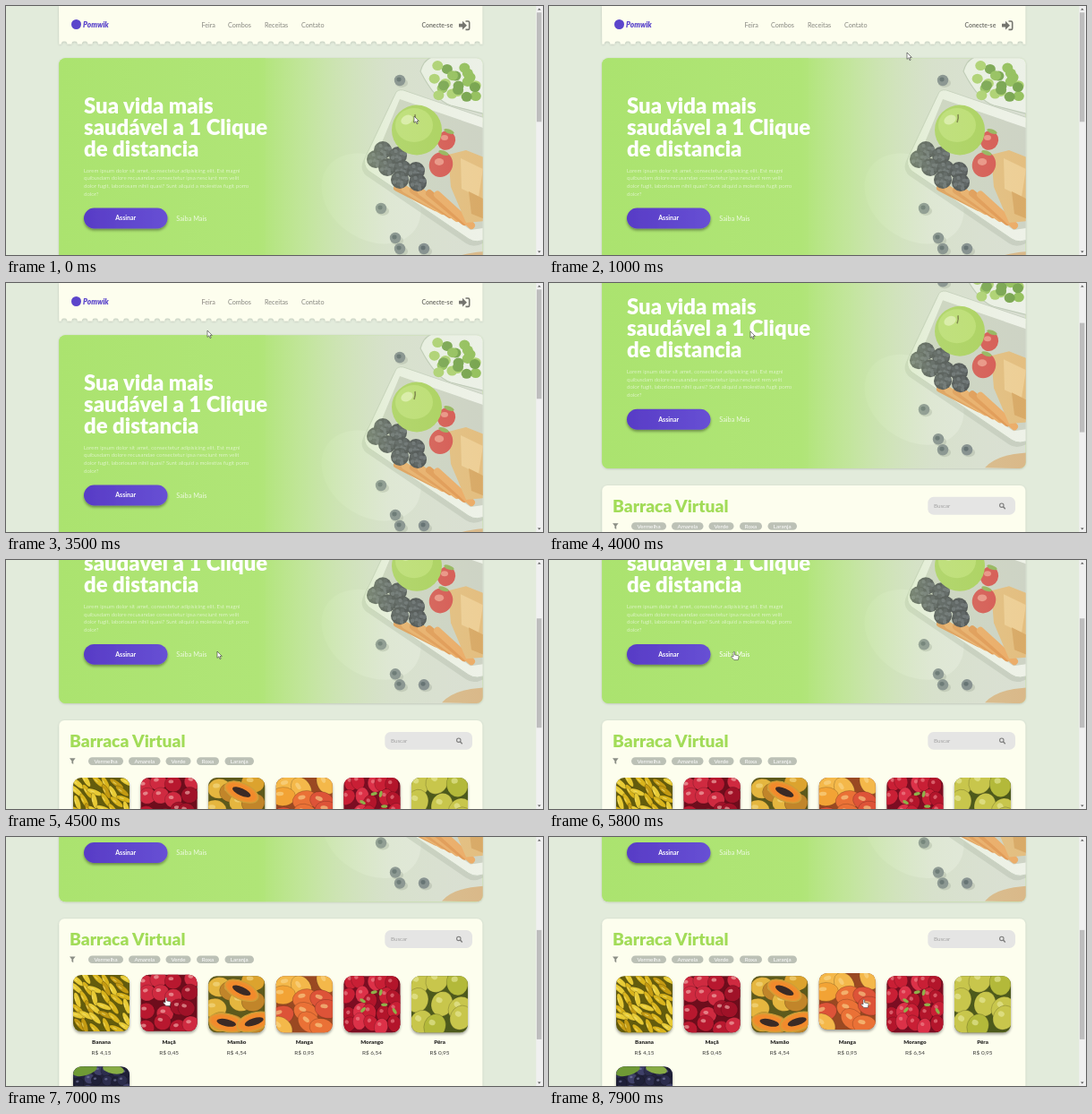
Write an HTML page that moves like this. It is 600x278 px and loops after 8000 ms.

```html
<!DOCTYPE html>
<html lang="pt">
<head>
<meta charset="utf-8">
<title>Barraca Virtual</title>
<style>
html, body { margin: 0; width: 100%; height: 100%; overflow: hidden; background: #e2ebdb; }
svg { display: block; width: 600px; height: 278px; font-family: Lato, "Open Sans", sans-serif; }
</style>
</head>
<body>
<svg id="stage" viewBox="0 0 600 278" xmlns="http://www.w3.org/2000/svg"></svg>
<script>
const LOOP = 8000, NOTCH = 43.9;
const rand = n => { const v = Math.sin(n * 12.9898 + 4.1) * 43758.5453; return v - Math.floor(v); };
const ease = p => { p = Math.min(1, Math.max(0, p)); return p * p * (3 - 2 * p); };
const range = n => [...Array(n).keys()];

// ---- drawing helpers ----
const text = (x, y, size, weight, fill, str, extra = '') =>
  `<text x="${x}" y="${y}" font-size="${size}" font-weight="${weight}" fill="${fill}" ${extra}>${str}</text>`;
const oval = (x, y, rx, ry, fill, turn = 0, extra = '') =>
  `<ellipse cx="${x}" cy="${y}" rx="${rx}" ry="${ry}" fill="${fill}" transform="rotate(${turn} ${x} ${y})" ${extra}/>`;
const box = (x, y, w, h, r, fill, extra = '') =>
  `<rect x="${x}" y="${y}" width="${w}" height="${h}" rx="${r}" fill="${fill}" ${extra}/>`;
const shape = (d, fill, extra = '') => `<path d="${d}" fill="${fill}" ${extra}/>`;

// Overlapping fruit on a jittered grid inside a 63 x 63 tile.
function pile({ cols, rows, rx, ry, turn = 0, spread = 30, tones, shine, seed }) {
  return range(cols * rows).map(i => {
    const k = seed * 100 + i * 5;
    const x = ((i % cols) + .2 + .6 * rand(k)) * 63 / cols;
    const y = (Math.floor(i / cols) + .2 + .6 * rand(k + 1)) * 63 / rows;
    const angle = turn + (rand(k + 2) - .5) * spread;
    const tone = tones[Math.floor(rand(k + 3) * tones.length)];
    return oval(x, y, rx, ry, tone, angle, 'stroke="#000" stroke-opacity=".22" stroke-width=".8"') +
      oval(x - rx * .25, y - ry * .3, rx * .3, ry * .22, shine, angle, 'opacity=".6"');
  }).join('');
}

const papayaHalf = (x, y, turn) =>
  oval(x, y, 20, 10, '#e9932f', turn, 'stroke="#c9a13a"') +
  oval(x, y, 17, 7.5, '#f28a2c', turn) + oval(x, y, 11, 4, '#3b2a25', turn);
const leaves = seed => range(6).map(i =>
  oval(6 + 51 * rand(seed + i), 5 + 52 * rand(seed + i + 20), 3.6, 1.8, '#8fb04a', 360 * rand(seed + i + 40))).join('');

const products = [
  { name: 'Banana', price: '4,15', bg: '#635c10', art: () =>
    pile({ cols: 6, rows: 6, rx: 9, ry: 3, turn: 48, spread: 60, tones: ['#d9b41c', '#e8cb35', '#c39a12'], shine: '#f6e880', seed: 1 }) },
  { name: 'Maçã', price: '0,45', bg: '#6e0d1c', art: () =>
    pile({ cols: 4, rows: 4, rx: 9.5, ry: 9, tones: ['#b8182f', '#cf2a40', '#a01228'], shine: '#f5b9b4', seed: 2 }) },
  { name: 'Mamão', price: '4,54', bg: '#5d5a1c', art: () =>
    pile({ cols: 3, rows: 3, rx: 13, ry: 11, tones: ['#dca32e', '#e5b63f', '#c1852a'], shine: '#f5dc8a', seed: 3 }) +
    papayaHalf(37, 16, 24) + papayaHalf(20, 52, 12) + papayaHalf(51, 51, -18) },
  { name: 'Manga', price: '0,95', bg: '#9a4a20', art: () =>
    pile({ cols: 3, rows: 4, rx: 14, ry: 10.5, turn: 25, spread: 90, tones: ['#f2a335', '#ea7136', '#f4b84a', '#dd5338'], shine: '#fbd98f', seed: 4 }) },
  { name: 'Morango', price: '6,54', bg: '#7b1020', art: () =>
    pile({ cols: 5, rows: 4, rx: 7.5, ry: 9.5, spread: 90, tones: ['#c91f35', '#dc3148', '#b3152b'], shine: '#f08a90', seed: 5 }) + leaves(7) },
  { name: 'Pêra', price: '0,95', bg: '#4d5a1a', art: () =>
    pile({ cols: 3, rows: 3, rx: 12, ry: 14, turn: 15, spread: 60, tones: ['#b3b93a', '#c8c64c', '#9ea72e'], shine: '#eaeba0', seed: 6 }) },
  { name: 'Uva', price: '3,20', bg: '#22213a', art: () =>
    pile({ cols: 6, rows: 6, rx: 5.8, ry: 5.8, tones: ['#2c2d4d', '#3f4068', '#1f2038'], shine: '#7d80aa', seed: 8 }) +
    oval(13, 4, 14, 6, '#6f9a35', -15) + oval(45, 3, 12, 5, '#88ad45', 10) }
].map((p, i) => ({ ...p, x: 75 + 75.6 * (i % 6), y: 374.8 + 101 * Math.floor(i / 6) }));

const nav = [['Feira', 218.5], ['Combos', 248], ['Receitas', 289], ['Contato', 330]];

function header() {
  const teeth = 41, step = 473 / teeth;
  const edge = range(teeth).map(() => `h-2.4a3.35 3.35 0 0 0 -6.7 0h${-(step - 9.1)}`).join('');
  return shape(`M59 0H532.3V42.6${edge}Z`, '#fdfeee', 'filter="url(#soft)"') +
    oval(78.5, 20.5, 5.5, 5.5, '#5b45cb') + text(86, 24, 8.4, 900, '#5b45cb', 'Pomwik', 'font-style="italic"') +
    nav.map(([label, x]) => text(x, 24.3, 7.2, 400, '#85857f', label, 'class="nav"')).join('') +
    text(464.5, 24.2, 6.9, 700, '#75756f', 'Conecte-se') +
    shape('M506 19.8h4v-3l5 4.9l-5 4.9v-3h-4z', '#75756f') +
    shape('M513.5 17h2.8q1.4 0 1.4 1.4v6.6q0 1.4-1.4 1.4h-2.8', 'none', 'stroke="#75756f" stroke-width="1.6"');
}

const berry = ([x, y]) => oval(x, y, 10, 10, '#34363f') + range(14).map(i =>
  oval(x + 8 * Math.cos(i * 2.4) * Math.sqrt(i / 14), y + 8 * Math.sin(i * 2.4) * Math.sqrt(i / 14), 2.3, 2.3, i % 2 ? '#555964' : '#41444e')).join('');
const blueberry = ([x, y]) => oval(x + 2, y + 3, 7, 5, '#a3aaa0', 0, 'opacity=".5"') +
  oval(x, y, 6.2, 6.2, '#737c84') + oval(x - 1, y - 1, 2.6, 2.4, '#495560');
const strawberry = (x, y, r) => oval(x, y, r, r * 1.1, '#d64a47', 25) + oval(x - 2, y - 3, r * .4, r * .3, '#ed8a7e') +
  oval(x + 3, y - r, 6, 2.3, '#8eb052', 20);

function lunch() {
  const carrots = range(6).map(i =>
    `<path d="M${437 + i * 9} ${203 + i * 1.5}L${480 + i * 8} ${225 + i * 4}" stroke="${i % 2 ? '#eda65e' : '#e39148'}" stroke-width="8" stroke-linecap="round"/>`).join('');
  const broccoli = range(22).map(i =>
    oval(478 + 48 * rand(i + 60), 66 + 36 * rand(i + 90), 6, 5.5, ['#8fbd55', '#a9cf69', '#709f45'][i % 3])).join('');
  const tray = 'M436 96Q440 92 447 95L538 126V259Q526 266 517 260L405 184Q398 177 402 168Z';
  return box(290, 58, 243, 234, 0, '#d9ded3') +
    oval(408, 215, 60, 45, '#e3e7de', 35) +
    shape('M463 73Q467 58 480 56H536V121L497 111Q480 106 463 73Z', '#edf1e9', 'stroke="#bcc7b6" stroke-width="1.2"') + broccoli +
    shape(tray, '#aeb5a8', 'transform="translate(-3 5)" opacity=".45"') +
    shape(tray, '#eff2ea', 'stroke="#c6cec0"') +
    shape('M440 104L533 136V248L519 250L410 176Z', '#ccd1c4') + carrots +
    shape('M494 166L514 161L537 170V240L514 242L497 202Z', '#e4ba79') +
    shape('M508 170L533 182L528 213L509 204Z', '#efcc91') + shape('M517 207L535 216V238L520 232Z', '#d8a45e') +
    [[421, 161], [413, 171], [438, 167], [426, 180], [443, 182], [458, 184], [440, 194], [460, 197]].map(berry).join('') +
    strawberry(492, 150, 10) + strawberry(486, 177, 13) +
    oval(459, 138.5, 28, 28, '#a6cf52') + oval(456, 133, 21, 19, '#b9dd68') + oval(448, 127, 7, 5, '#dcefa5', -25) +
    shape('M456 130Q458 125 457 121', 'none', 'stroke="#6b7130" stroke-width="1.6"') +
    [[440, 83], [419, 226], [435, 259], [440, 271], [467, 271]].map(blueberry).join('') +
    shape('M487 291Q500 276 535 274V292Z', '#d9b483');
}

function hero() {
  const lorem = ['Lorem ipsum dolor sit amet, consectetur adipisicing elit. Est magni',
    'quibusdam dolore recusandae consectetur ipsa nesciunt rem velit',
    'dolor fugit, laboriosam nihil quasi? Sunt aliquid a molestias fugit porro', 'dolor?'];
  return box(59.3, 58.3, 473.4, 233.4, 7, '#aee472', 'filter="url(#soft)"') +
    `<g clip-path="url(#heroClip)">${lunch()}${box(59, 58, 474, 234, 0, 'url(#fade)')}</g>` +
    ['Sua vida mais', 'saudável a 1 Clique', 'de distancia'].map((s, i) => text(87, 119.8 + i * 24.2, 23.9, 900, '#fff', s)).join('') +
    lorem.map((s, i) => text(87, 185.7 + i * 8.75, 6.2, 300, '#fff', s)).join('') +
    box(87, 225.6, 93.5, 22.8, 11.4, 'url(#violet)', 'filter="url(#drop)"') +
    text(133.7, 239.4, 7, 700, '#fff', 'Assinar', 'text-anchor="middle"') +
    text(190.3, 239.6, 7.3, 400, '#fff', 'Saiba Mais', 'id="more"');
}

function market() {
  const pills = [['Vermelha', 92, 39], ['Amarela', 137, 35.5], ['Verde', 178.5, 28], ['Roxa', 213, 25], ['Laranja', 244.5, 32.5]];
  return box(59.3, 310.8, 473, 320, 6, '#fdfeee', 'filter="url(#soft)"') +
    text(71, 340.4, 19.2, 900, '#a2dc58', 'Barraca Virtual') +
    box(423.3, 323.6, 97.7, 19.8, 6.5, '#e5e5e4') + text(430, 335.8, 6.2, 400, '#a3a3a3', 'Buscar') +
    '<circle cx="505.8" cy="332.9" r="2.2" fill="none" stroke="#7d7d7d" stroke-width="1.1"/><path d="M507.4 334.5l2.4 2.4" stroke="#7d7d7d" stroke-width="1.4"/>' +
    shape('M71 353h6.6l-2.4 3.1v3.6l-1.8-1.2v-2.4z', '#8b8e86') +
    pills.map(([s, x, w]) => box(x, 352, w, 8.6, 4.3, '#bcc1b6') +
      text(x + w / 2, 358.4, 6.3, 400, '#fff', s, 'text-anchor="middle"')).join('') +
    products.map(p => `<g class="tile"><rect x="${p.x}" y="${p.y}" width="63" height="63" rx="9" fill="${p.bg}" filter="url(#drop)"/>
      <g transform="translate(${p.x} ${p.y})"><g clip-path="url(#tileClip)">${p.art()}</g></g></g>` +
      text(p.x + 31.5, p.y + 75.9, 6.2, 900, '#2c2c2a', p.name, 'text-anchor="middle"') +
      text(p.x + 31.5, p.y + 87.2, 6.4, 400, '#3c3c3a', 'R$ ' + p.price, 'text-anchor="middle"')).join('');
}

const shadow = (id, dy, blur, alpha) =>
  `<filter id="${id}" x="-20%" y="-20%" width="140%" height="150%"><feDropShadow dx="0" dy="${dy}" stdDeviation="${blur}" flood-opacity="${alpha}"/></filter>`;

const stage = document.getElementById('stage');
stage.innerHTML = `<defs>
  ${shadow('soft', .6, .8, .18)}${shadow('drop', 2, 1.8, .38)}
  <clipPath id="heroClip">${box(59.3, 58.3, 473.4, 233.4, 7, '#000')}</clipPath>
  <clipPath id="tileClip">${box(0, 0, 63, 63, 9, '#000')}</clipPath>
  <linearGradient id="fade">
    <stop offset="0" stop-color="#abe36f"/><stop offset=".47" stop-color="#b0e577"/>
    <stop offset=".58" stop-color="#bde78f" stop-opacity=".82"/>
    <stop offset=".78" stop-color="#d2e8b8" stop-opacity=".28"/><stop offset="1" stop-color="#e0ecd0" stop-opacity=".08"/>
  </linearGradient>
  <linearGradient id="violet"><stop offset="0" stop-color="#583cc6"/><stop offset="1" stop-color="#6750d4"/></linearGradient>
</defs>
${box(0, 0, 600, 278, 0, '#e2ebdb')}
<g id="page">${header()}${hero()}${market()}</g>
${box(592.3, 0, 7.7, 278, 0, '#f0f0f0')}
${box(593, 7.3, 5.4, 122, 0, '#bdbdbd', 'id="thumb"')}
${shape('M594 4.6l1.8-2.2l1.8 2.2zM594 273.4l1.8 2.2l1.8-2.2z', '#555')}
<g id="cursor">
  ${shape('M0 0V7.4L1.8 5.8L3 8.6L4.2 8.1L3 5.4H5.3Z', '#fff', 'id="arrow" stroke="#333" stroke-width=".6"')}
  ${shape('M0 .8Q.8-.3 1.6.8V4L5.4 4.7Q6.2 5 6 6L5.3 9.6H.8L-2.2 6.2Q-2.2 5-1 5.3L0 6Z', '#fff', 'id="hand" stroke="#444" stroke-width=".6"')}
</g>`;

// ---- motion ----
// Cursor stops: time, x, y.
const route = [[0, 456, 123], [300, 456, 123], [1000, 400, 52], [1500, 342, 24], [1750, 342, 24], [2050, 309, 25], [2250, 309, 25],
  [2600, 262, 25], [2800, 262, 25], [3100, 226, 25], [3250, 226, 27], [3500, 225, 53], [4100, 225, 54], [4500, 236, 102],
  [4850, 206, 102], [5200, 142, 105], [5400, 142, 105], [5750, 206, 102], [6300, 206, 102], [6600, 108, 182], [6800, 112, 183],
  [7000, 178, 179], [7130, 180, 179], [7350, 258, 183], [7480, 260, 183], [7700, 351, 181], [8000, 351, 181]];
const wheel = [3650, 3850, 4050, 5950, 6150];

function pointer(t) {
  const i = Math.max(1, route.findIndex(p => p[0] >= t));
  const [t0, x0, y0] = route[i - 1], [t1, x1, y1] = route[i];
  const k = ease((t - t0) / (t1 - t0));
  return [x0 + (x1 - x0) * k, y0 + (y1 - y0) * k];
}
const scrollAt = t => wheel.reduce((sum, at) => sum + NOTCH * ease((t - at) / 180), 0);

const zones = {
  nav: nav.map(([s, x]) => [x - 2, 16, s.length * 3.4 + 4, 17]),
  button: [87, 225, 94, 24],
  more: [189, 231, 36, 13],
  login: [464, 15, 55, 13],
  tiles: products.map(p => [p.x, p.y, 63, 63])
};
const allZones = [...zones.nav, zones.button, zones.more, zones.login, ...zones.tiles];

function over([x, y, w, h], t) {
  const [px, py] = pointer(t), dx = px - x, dy = py + scrollAt(t) - y;
  return dx >= 0 && dx <= w && dy >= 0 && dy <= h;
}
// Share of the last 200 ms spent over a zone: a transition that depends on time only.
const hover = (zone, t) => ease(range(20).filter(i => over(zone, t - i * 10)).length / 20);
const mix = (a, b, k) => `rgb(${a.map((v, i) => Math.round(v + (b[i] - v) * k))})`;

const $ = id => document.getElementById(id);
const navNodes = [...document.querySelectorAll('.nav')], tileNodes = [...document.querySelectorAll('.tile')];

function draw(t) {
  const scroll = scrollAt(t), [x, y] = pointer(t);
  $('page').setAttribute('transform', `translate(0 ${-scroll})`);
  $('thumb').setAttribute('y', 7.3 + scroll * .44);
  navNodes.forEach((n, i) => n.setAttribute('fill', mix([133, 133, 127], [224, 72, 62], hover(zones.nav[i], t))));
  tileNodes.forEach((n, i) => n.setAttribute('transform', `translate(0 ${-3.4 * hover(zones.tiles[i], t)})`));
  $('more').setAttribute('opacity', .78 + .22 * hover(zones.more, t));
  const onLink = allZones.some(zone => over(zone, t));
  $('cursor').setAttribute('transform', `translate(${x} ${y})`);
  $('arrow').setAttribute('visibility', onLink ? 'hidden' : 'visible');
  $('hand').setAttribute('visibility', onLink ? 'visible' : 'hidden');
}

const start = performance.now();
function tick() {
  draw((performance.now() - start) % LOOP);
  requestAnimationFrame(tick);
}
tick();
</script>
</body>
</html>
```
